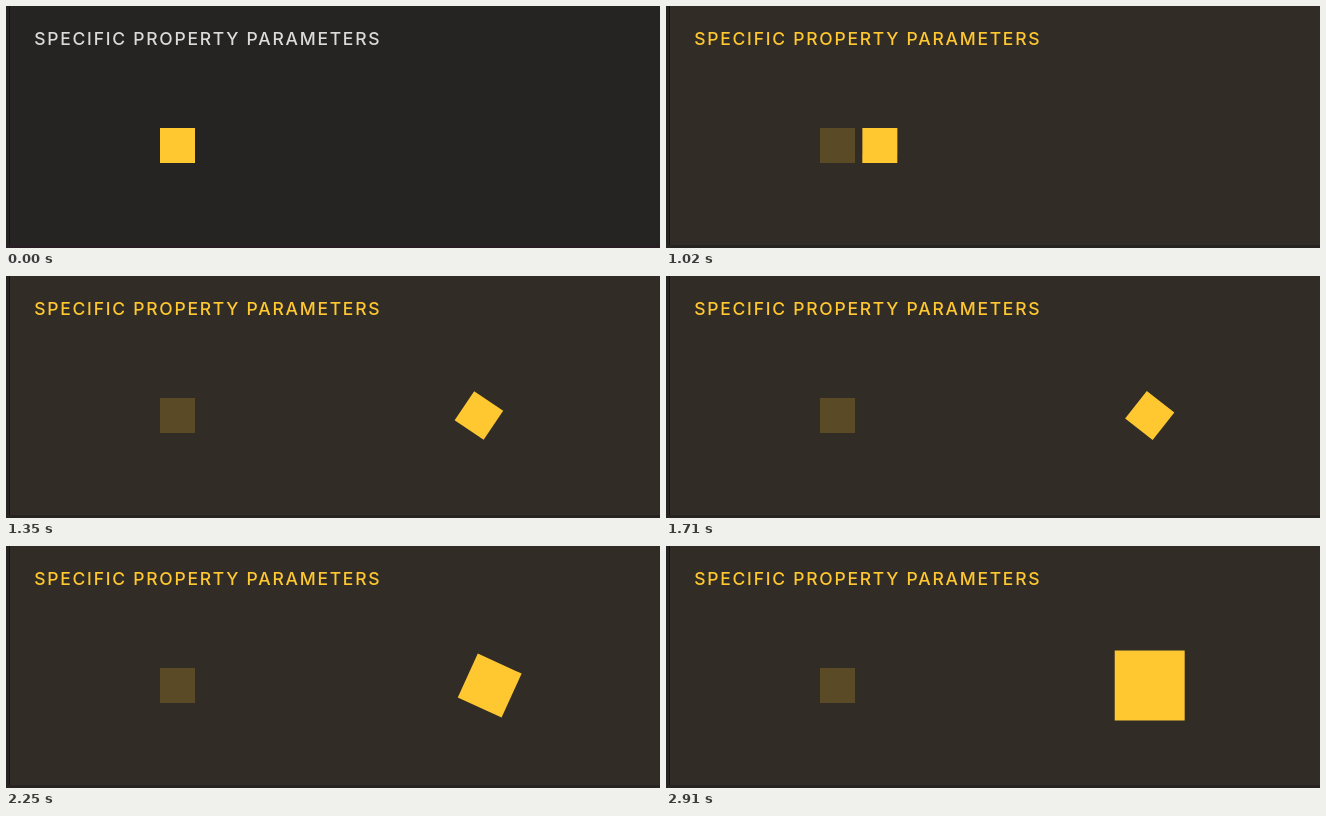
These frames come from a looping animation (654x242 px, 3390 ms). An HTML page:

```html
<!DOCTYPE html>
<html lang="en">
<head>
<meta charset="utf-8">
<title>Specific property parameters</title>
<style>
  html, body { margin: 0; width: 100%; height: 100%; overflow: hidden; background: #252423; }
  svg { display: block; width: 654px; height: 242px; }
  .panel { fill: #252423; }
  .edge { fill: #151414; }
  .next { fill: #281e23; }
  .title {
    fill: #dcdbda;
    font: 500 17.5px Inter, Roboto, sans-serif;
    letter-spacing: .1em;
  }
  .box { fill: #ffc830; }
  .ghost { fill: #5a4a26; }
  .active .panel { fill: #312c26; }
  .active .title { fill: #ffc830; }
  .active .next { fill: #272321; }
</style>
</head>
<body>
<svg id="stage" viewBox="0 0 654 242">
  <rect class="panel" x="4" width="650" height="239"/>
  <rect class="edge" x="3" width="1" height="239"/>
  <rect class="next" y="239" width="654" height="3"/>
  <text class="title" x="28.2" y="39">SPECIFIC PROPERTY PARAMETERS</text>
  <rect class="ghost" x="154" y="122" width="35" height="35"/>
  <rect class="box" id="box" x="-17.5" y="-17.5" width="35" height="35"/>
</svg>
<script>
  const LOOP = 3390, STEP = 30;
  const ACTIVE_AT = 300, MOVE_AT = 1020, REST_AT = 2910;
  const LEAD = 14, RATE = 1.0417; // tween clock at the first step, and its speed

  const stage = document.getElementById('stage');
  const box = document.getElementById('box');

  const outElastic = t => 1 - 2 ** (-10 * t) * Math.cos(4 * Math.PI * t);
  const inOutSine = t => (1 - Math.cos(Math.PI * t)) / 2;
  const inOutQuart = t => t < .5 ? 8 * t ** 4 : 1 - 8 * (1 - t) ** 4;

  const progress = (time, delay, duration) =>
    Math.min(1, Math.max(0, (time - delay) / duration));

  function draw(ms) {
    const held = Math.min(Math.floor(ms / STEP) * STEP, REST_AT);
    const time = held < MOVE_AT ? 0 : LEAD + (held - MOVE_AT) * RATE;
    const x = 171.5 + 312.5 * outElastic(progress(time, 0, 800));
    const angle = 360 * inOutSine(progress(time, 0, 1800));
    const scale = 1 + inOutQuart(progress(time, 550, 1600));
    stage.classList.toggle('active', ms >= ACTIVE_AT);
    box.setAttribute('transform', `translate(${x} 139.5) rotate(${angle}) scale(${scale})`);
  }

  const start = performance.now();
  function tick() {
    draw((performance.now() - start) % LOOP);
    requestAnimationFrame(tick);
  }
  tick();
</script>
</body>
</html>
```
